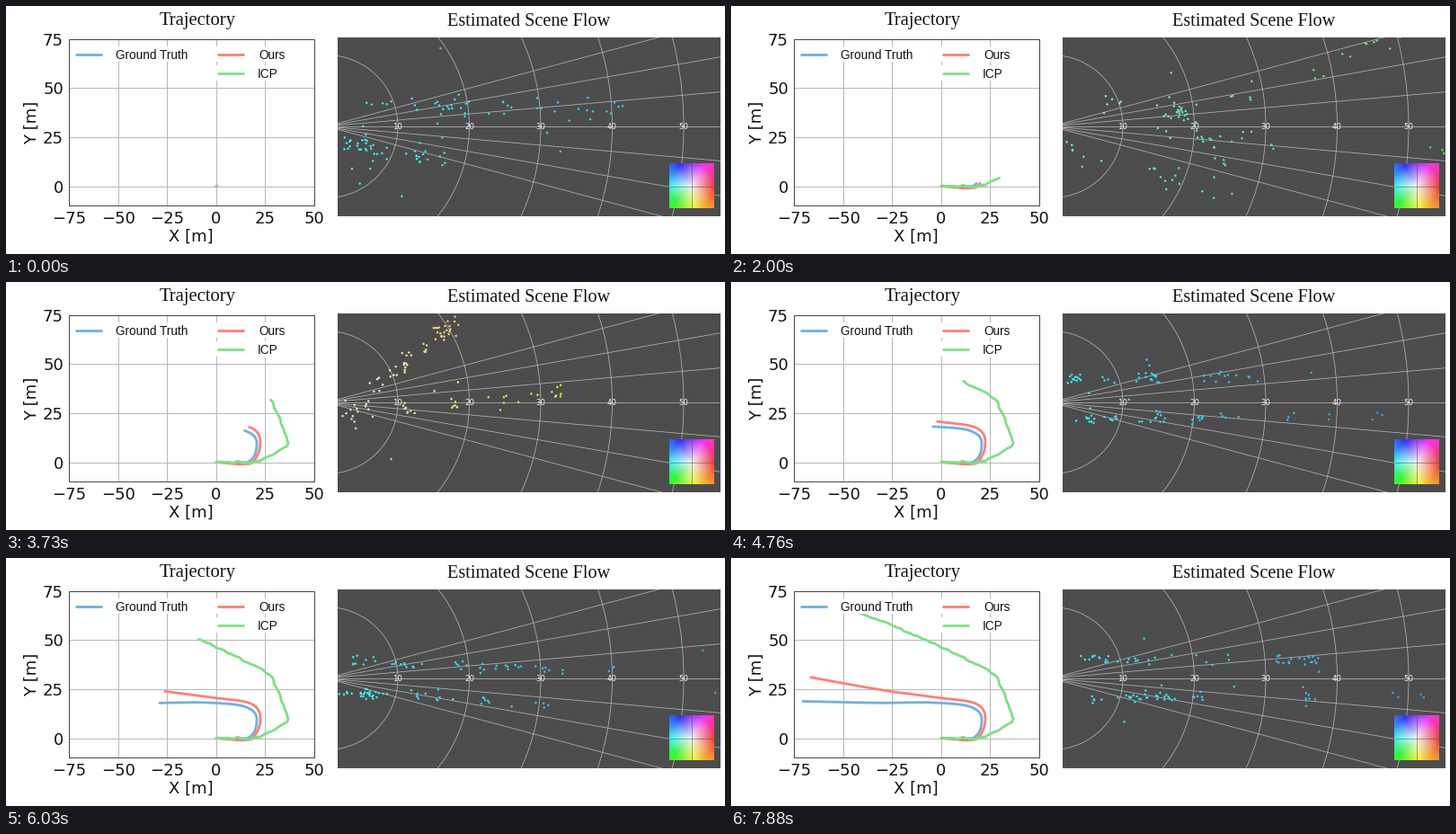
A matplotlib script for the animation above (7.91 s loop, 800x276 px).

```python
import matplotlib.pyplot as plt
import numpy as np
from matplotlib.animation import FuncAnimation
from matplotlib.colors import hsv_to_rgb
from matplotlib.patches import Circle, Rectangle

W, H, DPI = 800, 276, 100
FRAMES, STEP = 226, 35
PT = 72 / DPI                        # points per pixel
BLUE, RED, GREEN = "#70b0e2", "#ff7f76", "#7fe084"
GRID, WEB = "#b8b8b8", "#b0b0b0"
rng = np.random.default_rng(7)

fig = plt.figure(figsize=(W / DPI, H / DPI), dpi=DPI, facecolor="white")
ax = fig.add_axes([0, 0, 1, 1])
ax.axis("off")


def text(x, y, s, size, font="DejaVu Sans", **kw):
    kw = {"ha": "center", "va": "baseline", "color": "#111111", **kw}
    ax.text(x, y, s, fontsize=size * PT, family=font, **kw)


def line(xs, ys, color, width, z, **kw):
    return ax.plot(xs, ys, color=color, lw=width * PT, zorder=z, **kw)[0]


def box(x0, y0, x1, y1, z, **kw):
    patch = Rectangle((x0, y0), x1 - x0, y1 - y0, zorder=z, **kw)
    return ax.add_patch(patch)


# ---- trajectory plot ----
LEFT, RIGHT, TOP, BOTTOM = 70, 343, 37, 222
M = (RIGHT - LEFT) / 125             # pixels per metre
X0, Y0 = LEFT + 75 * M, 200.5

text(213.5, 21.5, "Trajectory", 20.7, "Liberation Serif")
for v in range(-75, 51, 25):
    x = X0 + v * M
    line([x, x], [TOP, BOTTOM], GRID, 1, 1)
    text(x, 241.5, str(v).replace("-", "\u2212"), 18)
for v in range(0, 76, 25):
    y = Y0 - v * M
    line([LEFT, RIGHT], [y, y], GRID, 1, 1)
    text(64, y, str(v), 18, ha="right", va="center_baseline")
text(206, 262, "X [m]", 18)
text(29, 130, "Y [m]", 18, rotation=90, va="center")
box(LEFT, TOP, RIGHT, BOTTOM, 6, fill=False, ec="#484848", lw=PT)

for x, y, color, tx, end, name in ((78, 54, BLUE, 122, 209, "Ground Truth"),
                                   (236, 54, RED, 281, 314, "Ours"),
                                   (236, 75, GREEN, 280, 314, "ICP")):
    box(x - 5, y - 9, end, y + 8, 4, fc="white", ec="none")
    line([x, x + 28], [y, y], color, 2.8, 5, solid_capstyle="round")
    text(tx, y + 5.3, name, 13.6, "Liberation Sans", ha="left", zorder=5)

T = np.arange(FRAMES + 2) * STEP / 1000
KNOTS = np.array([0, 1.33, 1.9, 2.3, 2.7, 3.2, 3.73, 4.76, 6.03, 7.95])


def spline(*values):
    """Smooth curve over T through the values at KNOTS."""
    p = np.array(values, float)
    m = np.gradient(p, KNOTS)
    i = np.clip(np.searchsorted(KNOTS, T, "right") - 1, 0, len(p) - 2)
    h = KNOTS[i + 1] - KNOTS[i]
    u = (T - KNOTS[i]) / h
    return ((2 * u**3 - 3 * u**2 + 1) * p[i] + (u**3 - 2 * u**2 + u) * h * m[i]
            + (3 * u**2 - 2 * u**3) * p[i + 1] + (u**3 - u**2) * h * m[i + 1])


def wobble():
    return np.convolve(rng.normal(0, 1.2, len(T)), np.ones(5) / 5, "same")


truth = np.column_stack([
    spline(234, 262, 271, 277, 279, 276.5, 266, 226, 172, 78),
    spline(200.5, 201, 199.3, 192, 181, 172, 165.5, 161, 161.3, 159.4)])
ours = np.column_stack([
    spline(234, 267, 275, 281, 283, 280, 271, 231, 178, 87),
    spline(200.5, 202.5, 200, 190, 178, 168, 161.5, 155.5, 148.5, 132.5)])
icp = np.column_stack([
    spline(234, 278, 291, 313, 310, 303, 295, 260, 216, 140) + wobble(),
    spline(200.5, 200, 194.5, 181, 168, 149, 132, 112, 91, 59.5) + wobble()])
paths = [(p, line([], [], c, 2.8, 3, solid_capstyle="round",
                  solid_joinstyle="round"))
         for p, c in ((truth, BLUE), (ours, RED), (icp, GREEN))]

# ---- scene flow panel ----
PX0, PY0, PX1, PY1 = 369, 34.5, 794.5, 233.5
CX, CY, R = 356.5, 134, 7.95         # sensor position, pixels per metre

text(581.5, 21.5, "Estimated Scene Flow", 20.3, "Liberation Serif")
panel = box(PX0, PY0, PX1, PY1, 1, fc="#4d4c4d", ec="none")
for d in range(10, 61, 10):
    ring = Circle((CX, CY), d * R, fill=False, ec=WEB, lw=.8 * PT, zorder=2)
    ax.add_patch(ring)
    ring.set_clip_path(panel)
    if d < 60:
        text(CX + d * R, CY + 3.2, str(d), 8.7, color="#f0f0f0", zorder=5)
for a in np.radians(range(-15, 16, 5)):
    ray = line([CX, CX + 460], [CY, CY + 460 * np.tan(a)], WEB, .8, 2)
    ray.set_clip_path(panel)


def flow_rgb(u, v):
    """Colour of a flow vector: direction as hue, length as saturation."""
    a = np.arctan2(v, u)
    hue = -np.degrees(a) + 22 * np.minimum(np.sin(a), 0)
    sat = np.clip(np.hypot(u, v), 0, .78)
    return hsv_to_rgb(np.stack([hue % 360 / 360, sat, np.full_like(sat, .95)], -1))


u, v = np.meshgrid(np.linspace(-.75, .75, 50), np.linspace(.75, -.75, 50))
ax.imshow(flow_rgb(u, v), extent=(738, 788, 225.5, 175.5), aspect="auto", zorder=7)
line([738, 788], [200.5, 200.5], "#505050", .5, 8)
line([763, 763], [175.5, 225.5], "#505050", .5, 8)

# Each scene: (spread, two walls as x1, y1, x2, y2) that reflect the radar.
KEYS = np.array([0, 1.33, 2.70, 3.73, 4.76, 6.03, 7.88])
SCENES = [
    (8, (400, 113, 760, 113), (378, 152, 507, 176)),
    (12, (440, 86, 690, 84), (376, 140, 640, 165)),
    (8, (436, 140, 702, 125), (430, 130, 470, 215)),
    (8, (400, 125, 510, 36), (378, 143, 620, 125)),
    (4, (380, 108, 700, 104), (385, 153, 730, 150)),
    (4, (371, 116, 690, 125), (372, 150, 655, 166)),
    (4, (372, 113, 676, 114), (400, 156, 792, 151)),
]
SPEED = [.74, .7, .4, .05, .74, .74, .74]
SPIN = [-.05, -.12, .4, .35, -.1, -.08, -.08]


def scatter_wall(k, spread, x1, y1, x2, y2, n=50):
    """Clumped dots along a wall, denser near the car, with a few strays."""
    s = rng.choice(rng.random(18) ** 1.5, n) + rng.normal(0, .015, n)
    sd = spread * np.where(rng.random(n) < .08, 5, .8)
    x = x1 + (x2 - x1) * s + rng.normal(0, .5 * spread, n)
    y = y1 + (y2 - y1) * s + rng.normal(0, sd)
    born = rng.uniform(KEYS[k - 1], KEYS[k], n) if k else np.zeros(n)
    gone = rng.uniform(KEYS[k] + .02, KEYS[k + 1] if k < 6 else 9, n)
    return np.column_stack([x, y, np.full(n, KEYS[k]), born, gone])


dots = np.vstack([scatter_wall(k, spread, *wall)
                  for k, (spread, *walls) in enumerate(SCENES) for wall in walls])

# Distance driven and heading of the car, which shift the dots.
step = np.diff(truth, axis=0)
dist = np.concatenate([[0], np.cumsum(np.hypot(*step.T))]) / M * R
turn = np.unwrap(np.arctan2(-step[:, 1], step[:, 0]))
turn = np.append(turn, turn[-1]) * .35
cloud = ax.scatter([], [], s=3.2, linewidths=0, zorder=4)
cloud.set_clip_path(panel)


def radar(i):
    t = i * STEP / 1000
    x, y, key = dots[(dots[:, 3] <= t) & (t < dots[:, 4]), :3].T
    a = turn[i] - np.interp(key, T, turn)
    x, y = x - CX, y - CY
    x, y = x * np.cos(a) - y * np.sin(a), x * np.sin(a) + y * np.cos(a)
    x -= dist[i] - np.interp(key, T, dist)
    noise = np.random.default_rng(i).normal(0, .35, (2, len(x)))
    x = PX0 + (x + CX - PX0 + noise[0]) % (PX1 - PX0)
    y = PY0 + (y + CY - PY0 + noise[1]) % (PY1 - PY0)
    v, w = np.interp(t, KEYS, SPEED), np.interp(t, KEYS, SPIN)
    rgb = flow_rgb(-v + w * (CY - y) / 100, -w * (x - CX) / 100)
    return np.column_stack([x, y]), rgb


def update(i):
    for p, ln in paths:
        ln.set_data(p[:i + 2, 0], p[:i + 2, 1])
    xy, rgb = radar(i)
    cloud.set_offsets(xy)
    cloud.set_facecolors(rgb)
    return [ln for _, ln in paths] + [cloud]


ax.set_xlim(0, W)
ax.set_ylim(H, 0)
anim = FuncAnimation(fig, update, frames=FRAMES, interval=STEP, repeat=True)
plt.show()
```
